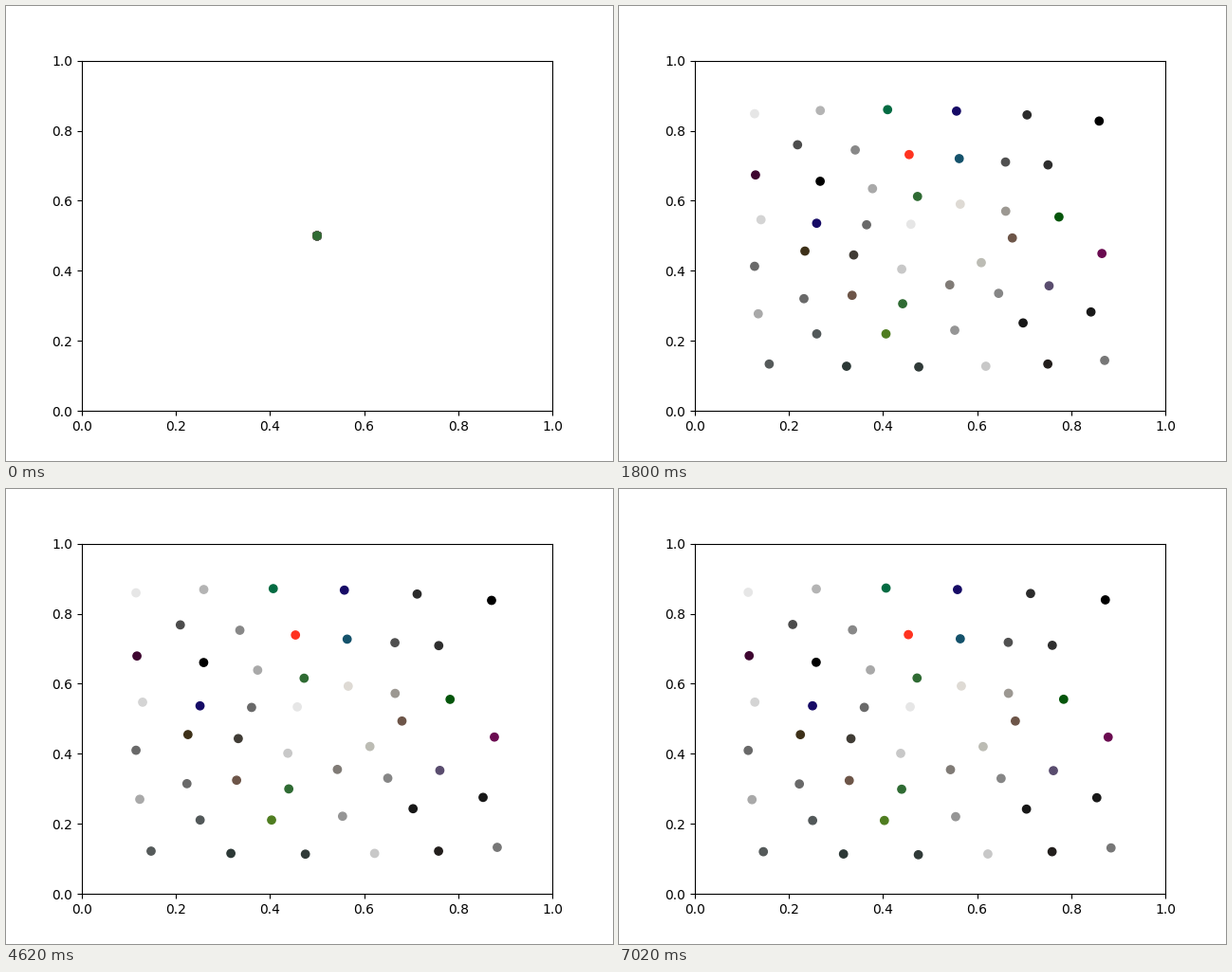
Animation of 640x480 px, one loop 7.05 s. Source, as a matplotlib script:

```python
import numpy as np
import matplotlib.pyplot as plt
from matplotlib.animation import FuncAnimation

STEP = 30
FRAMES = 235
CENTER = np.array([0.5, 0.5])

# Each row: a few pixel points its curve passes through, and its dot colours
ROWS = [
    ([(136, 109), (319, 105), (513, 117)],
     "#e6e6e6 #b4b4b4 #036b42 #160a66 #2b2b2b #000000"),
    ([(183, 143), (333, 156), (457, 165)],
     "#4c4c4c #888888 #ff3320 #14526b #505050 #2e2e2e"),
    ([(137, 176), (265, 191), (361, 208), (469, 222)],
     "#3e0530 #000000 #a9a9a9 #2f6b33 #dedad4 #9c9892 #04550a"),
    ([(143, 225), (232, 230), (307, 230)],
     "#d4d4d4 #160a66 #696969 #e6e6e6"),
    ([(384, 272), (418, 245)],
     "#bcbcb4 #6d5548"),
    ([(136, 276), (262, 268), (385, 304), (516, 262)],
     "#696969 #3d3018 #403c35 #c8c8c8 #807b76 #868686 #594c6e #6a0a50"),
    ([(204, 350), (355, 346), (504, 326)],
     "#525859 #4f7d20 #959595 #171717 #181818"),
    ([(152, 383), (353, 386), (519, 379)],
     "#555a5a #2c3836 #303a38 #c8c8c8 #221e1c #777777"),
    ([(140, 328), (216, 308), (298, 317)],
     "#a9a9a9 #696969 #6d5548 #2f6b33"),
]


def along(points, n):
    """n evenly timed places on the polynomial through the points."""
    k = len(points)
    fit = np.polyfit(np.linspace(0, 1, k), points, k - 1)
    powers = np.vander(np.linspace(0, 1, n), k)
    return powers @ fit


def to_axes(xy):
    return np.column_stack([(xy[:, 0] - 80) / 496, (427.4 - xy[:, 1]) / 369.6])


def spread(t):
    """Quick burst from the centre followed by a slow relaxation."""
    return 1 - 0.9 * np.exp(-(t / 770) ** 2) - 0.1 * np.exp(-t / 1600)


colors = [c for _, row in ROWS for c in row.split()]
homes = to_axes(np.vstack([along(pts, len(row.split())) for pts, row in ROWS]))

fig, ax = plt.subplots(figsize=(6.4, 4.8), dpi=100)
fig.subplots_adjust(left=0.125, right=0.9, bottom=0.11, top=0.88)
dots = ax.scatter(*np.tile(CENTER, (len(colors), 1)).T, c=colors)
ax.set(xlim=(0, 1), ylim=(0, 1))


def update(i):
    dots.set_offsets(CENTER + spread(i * STEP) * (homes - CENTER))
    return (dots,)


anim = FuncAnimation(fig, update, frames=FRAMES, interval=STEP,
                     repeat=True, repeat_delay=0)
plt.show()
```
